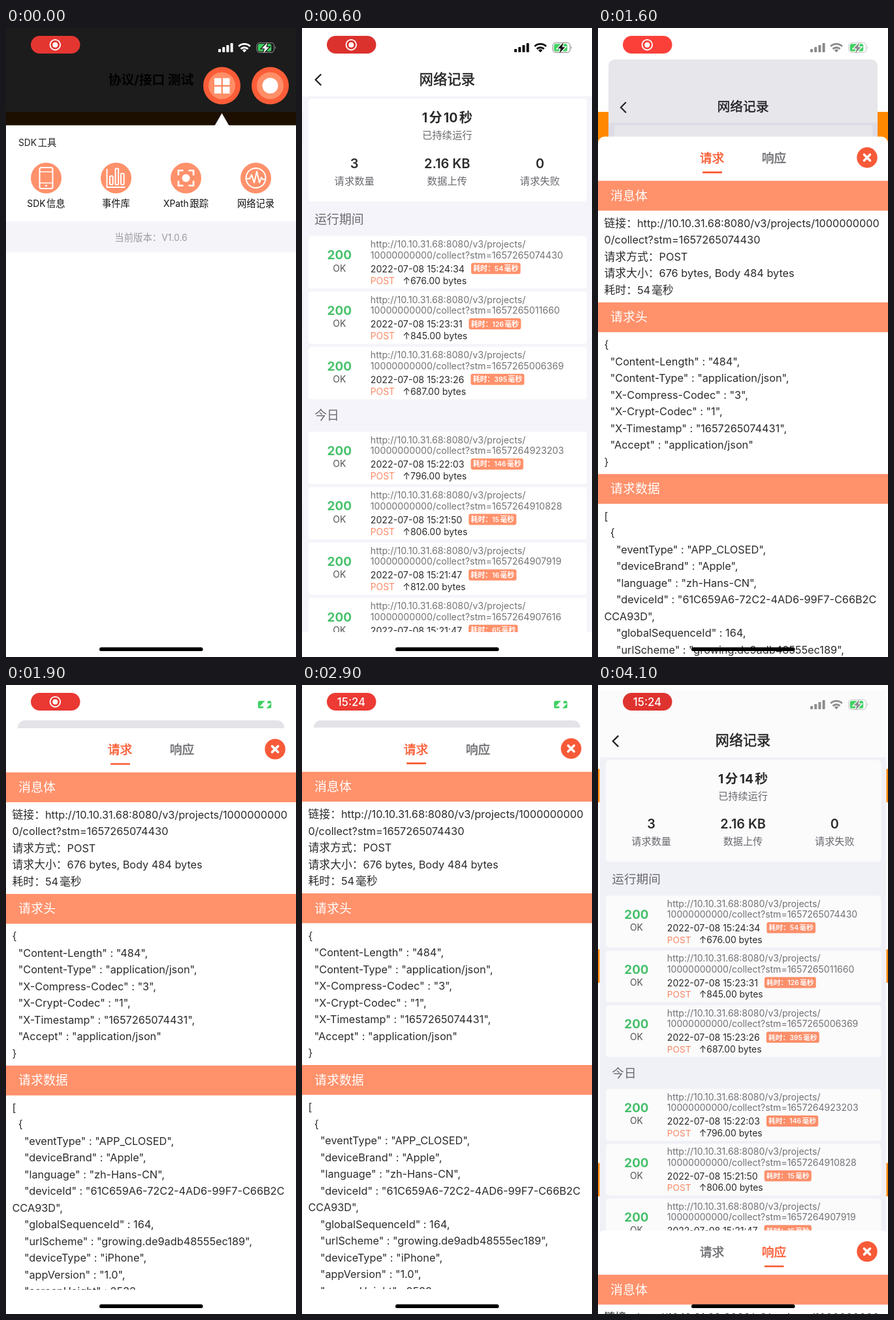
Animation, 444 px wide and 960 px high, one loop 4200 ms. Source, as an HTML page:

```html
<!DOCTYPE html>
<html lang="zh-CN">
<head>
<meta charset="utf-8">
<title>网络记录</title>
<style>
html, body { margin: 0; width: 100%; height: 100%; overflow: hidden; background: #fff; }
svg { display: block; width: 444px; height: 960px; font-family: Inter, "Noto Sans CJK SC", "Noto Sans CJK", sans-serif; }
</style>
</head>
<body>
<svg id="stage" viewBox="0 0 444 960" xmlns="http://www.w3.org/2000/svg"></svg>
<script>
const LOOP = 4200, STEP = 100;
const PUSH = 60, OPEN = 1395.6, CLOSE = 3912, TAB = 3300, CLOCK = 2400;
const RED = '#f9582f', PEACH = '#ff916b', DARK = '#2b2b2b', GREY = '#6a6a6f';

const pen = document.createElement('canvas').getContext('2d');
const measure = (str, font) => {
  pen.font = font + ' Inter, sans-serif';
  return pen.measureText(str).width;
};

const rect = (x, y, w, h, fill, r = 0, more = '') =>
  `<rect x="${x}" y="${y}" width="${w}" height="${h}" rx="${r}" fill="${fill}" ${more}/>`;
const circle = (x, y, r, fill, more = '') =>
  `<circle cx="${x}" cy="${y}" r="${r}" fill="${fill}" ${more}/>`;
const line = (d, width, color = '#fff', more = '') =>
  `<path d="${d}" fill="none" stroke="${color}" stroke-width="${width}" ${more}/>`;

// Chinese runs are slightly larger, with a small gap where they touch Latin ones
const HAN = /([\u3000-\u9fff\uff00-\uffef]+)/;
const mixed = (str, size) => str.split(HAN).filter(Boolean).map((run, i, all) => {
  const touch = i && /[\w\u4e00-\u9fff]$/.test(all[i - 1]) && /^[\w\u4e00-\u9fff]/.test(run);
  const em = HAN.test(run) ? size * 1.035 : size;
  return `<tspan font-size="${em.toFixed(2)}" dx="${touch ? (size * 0.12).toFixed(2) : 0}">${run}</tspan>`;
}).join('');

const text = (x, y, str, size, fill = DARK, weight = 400, anchor = 'start', more = '') =>
  `<text x="${x}" y="${y}" font-size="${size}" fill="${fill}" font-weight="${weight}" text-anchor="${anchor}" ${more}>${mixed(str, size)}</text>`;
const mid = (x, y, str, size, fill, weight, more) => text(x, y, str, size, fill, weight, 'middle', more);
// a thin outline gives the medium weight
const medium = (x, y, str, size, fill, id) =>
  mid(x, y, str, size, 'currentColor', 400, `id="${id}" color="${fill}" stroke="currentColor" stroke-width=".45"`);

function app() {
  return rect(0, 0, 444, 960, '#fff') +
    [128, 403.5, 729.5].map(y => rect(0, y, 444, 51, '#ff8800')).join('') +
    mid(222, 86, '协议/接口 测试', 19.1, '#000', 700);
}

function menu() {
  const button = x => circle(x, 88, 28.5, '#fc5d38') + circle(x, 88, 20.5, '#ff8f68');
  const tiles = [319, 332].map(x => [76.5, 89.5].map(y => rect(x, y, 10.5, 10.5, '#fff')).join('')).join('');
  const icons = [
    rect(51.5, 213, 20, 32, 'none', 2.5, 'stroke="#fff" stroke-width="2"') +
      line('M51.5 219.5h20M51.5 236.5h20', 1.6) + circle(61.5, 240.8, 1.5, '#fff'),
    line('M154.5 215v28H182.5', 2) +
      [[159, 226], [167.5, 214.5], [176, 222]].map(([x, y]) =>
        rect(x, y, 4.6, 239 - y, 'none', 1, 'stroke="#fff" stroke-width="2"')).join(''),
    line('M264 225v-7.5h7.5M279.5 217.5h7.5v7.5M287 233v7.5h-7.5M271.5 240.5h-7.5v-7.5', 2.6) +
      circle(275.5, 229, 6, '#fff'),
    circle(382.5, 229, 15, 'none', 'stroke="#fff" stroke-width="2"') +
      line('M368 230h5l3-6 4 12 4-17 4 17 3-8 2 3h4.5', 2, '#fff', 'stroke-linejoin="round"')
  ];
  const names = ['SDK信息', '事件库', 'XPath跟踪', '网络记录'];
  return rect(0, 0, 444, 960, '#000', 0, 'opacity=".89"') +
    button(330.5) + tiles + button(404.5) + circle(404.5, 88, 12, '#fff') +
    rect(0, 148.5, 444, 812, '#fff') +
    '<path d="M319.5 149l11-19 11 19z" fill="#fff"/>' +
    text(19, 180, 'SDK工具', 13.8, '#222') +
    icons.map((icon, i) => {
      const x = 61.5 + 107 * i;
      return circle(x, 229, 23.5, PEACH) + icon + mid(x, 273, names[i], 13.8, '#111');
    }).join('') +
    rect(0, 295, 444, 47.5, '#f5f5f9') +
    mid(222, 325, '当前版本：V1.0.6', 13.9, '#9b9b9f');
}

function row(y, [stm, clock, ms, bytes]) {
  const size = 14.2, date = '2022-07-08 ' + clock;
  const tagX = 104.5 + measure(date, size + 'px') + 10;
  const tagW = 62 + measure(ms, '600 10.6px');
  return rect(9.5, y, 426.5, 80, '#fff', 5) +
    mid(57, y + 35.8, '200', 19, '#47c26a', 700) +
    mid(57, y + 54, 'OK', 14, '#555') +
    text(104.5, y + 17.5, 'http://10.10.31.68:8080/v3/projects/', size, '#747478') +
    text(104.5, y + 34, '10000000000/collect?stm=' + stm, size, '#747478') +
    text(104.5, y + 55, date, size) +
    rect(tagX, y + 41, tagW, 17, PEACH, 3) +
    mid(tagX + tagW / 2, y + 53.4, `耗时：${ms}毫秒`, 10.5, '#fff', 600) +
    text(104.5, y + 73, 'POST', 13.9, '#fa8a66') +
    text(154, y + 73, `↑${bytes}.00 bytes`, 14);
}

function list() {
  const stats = [['3', '请求数量'], ['2.16 KB', '数据上传'], ['0', '请求失败']];
  const recent = [
    ['1657265074430', '15:24:34', '54', 676],
    ['1657265011660', '15:23:31', '126', 845],
    ['1657265006369', '15:23:26', '395', 687]
  ];
  const today = [
    ['1657264923203', '15:22:03', '146', 796],
    ['1657264910828', '15:21:50', '15', 806],
    ['1657264907919', '15:21:47', '16', 812],
    ['1657264907616', '15:21:47', '65', 812]
  ];
  const rows = (top, data) => data.map((d, i) => row(top + 84.6 * i, d)).join('');
  return rect(0, 0, 444, 960, '#fff', 0, 'id="paper"') +
    line('M29 70.5l-8.5 8.5 8.5 8.5', 2.3, '#222') +
    medium(222, 85.5, '网络记录', 20.6, '#222', 'title') +
    '<g clip-path="url(#safe)">' +
    rect(0, 104, 444, 818, '#f4f4fa') +
    rect(9.5, 108, 426.5, 157, '#fff', 5) +
    mid(222, 144, '', 19.4, DARK, 700, 'id="uptime"') +
    mid(222, 169, '已持续运行', 14.8, GREY) +
    stats.map(([n, label], i) =>
      mid(80 + 142 * i, 214, n, 20, DARK, 600) + mid(80 + 142 * i, 239, label, 14.8, GREY)).join('') +
    text(19, 299, '运行期间', 18.2, GREY) + rows(317.5, recent) +
    text(19, 598, '今日', 18.2, GREY) + rows(616, today) +
    '</g>' +
    rect(0, 0, 444, 960, '#140f35', 0, 'id="shade"');
}

const bar = (y, label) => rect(0, y, 444, 45.5, PEACH) + text(19, y + 29.5, label, 18.3, '#fff');

// leading spaces become indentation
const lines = (y, str) => str.split('\n').map((s, i) => {
  const t = s.trimStart();
  return text(9.5 + 4.6 * (s.length - t.length), y + 25.5 * i, t, 16.25);
}).join('');

const LINK = `链接：http://10.10.31.68:8080/v3/projects/1000000000
0/collect?stm=1657265074430
`;

function request() {
  return bar(132.5, '消息体') + lines(203, LINK + `请求方式：POST
请求大小：676 bytes, Body 484 bytes
耗时：54毫秒`) +
    bar(318, '请求头') + lines(388.5, `{
  "Content-Length" : "484",
  "Content-Type" : "application/json",
  "X-Compress-Codec" : "3",
  "X-Crypt-Codec" : "1",
  "X-Timestamp" : "1657265074431",
  "Accept" : "application/json"
}`) +
    bar(580, '请求数据') + lines(650, `[
  {
    "eventType" : "APP_CLOSED",
    "deviceBrand" : "Apple",
    "language" : "zh-Hans-CN",
    "deviceId" : "61C659A6-72C2-4AD6-99F7-C66B2C
CCA93D",
    "globalSequenceId" : 164,
    "urlScheme" : "growing.de9adb48555ec189",
    "deviceType" : "iPhone",
    "appVersion" : "1.0",
    "screenHeight" : 2532,`);
}

function response() {
  return bar(132.5, '消息体') + lines(203, LINK + `返回码：200
返回信息：OK`) +
    bar(292.5, '响应头') + lines(363, `{
  "Content-Type" : "application/json",
  "Connection" : "keep-alive",
  "Keep-Alive" : "timeout=60",
  "Date" : "Fri, 08 Jul 2022 07:24:34 GMT",
  "Access-Control-Allow-Origin" : "*",
  "Content-Length" : "2"
}`);
}

function sheet() {
  return rect(0, 65, 444, 960, '#fff', 10) +
    medium(174.5, 104.5, '请求', 18.1, RED, 'tabA') +
    medium(269.5, 104.5, '响应', 18.1, GREY, 'tabB') +
    rect(160, 118.3, 30, 2.6, RED, 1, 'id="mark"') +
    circle(412, 97, 15.7, '#f75a38') +
    line('M407.5 92.5l9 9M416.5 92.5l-9 9', 3.6, '#fff', 'stroke-linecap="round"') +
    `<g clip-path="url(#safe)"><g id="request">${request()}</g><g id="response">${response()}</g></g>`;
}

function status() {
  const bolt = 'M400.2 22.2l-8.7 9h4.6l-1.9 7 8.7-9h-4.6z';
  const bars = [5, 8, 11, 14].map((h, i) => rect(325 + 6.2 * i, 37 - h, 4, h, 'currentColor', 1)).join('');
  return rect(38, 12, 75.5, 27, RED, 13.5, 'id="pill"') +
    '<g id="rec">' + circle(75.3, 25.7, 7.8, 'none', 'stroke="#fff" stroke-width="1.8"') + circle(75.3, 25.7, 4, '#fff') + '</g>' +
    mid(75.5, 32, '15:24', 16.8, '#fff', 500, 'id="clock"') +
    '<g id="ink">' + bars +
    line('M356.2 28a12.5 12.5 0 0 1 17.6 0M359.5 32a7.8 7.8 0 0 1 11 0', 2.8, 'currentColor') +
    '<path d="M365 37.3l-3.2-3.4a4.6 4.6 0 0 1 6.4 0z" fill="currentColor"/>' +
    rect(384, 22.5, 26.5, 14.8, 'none', 4.5, 'stroke="currentColor" stroke-width="1.2" opacity=".45"') +
    '<path d="M412 27.5q2 2.4 0 4.8z" fill="currentColor" opacity=".5"/>' +
    `<mask id="cut">${rect(380, 18, 36, 24, '#fff')}<path d="${bolt}" stroke="#000" stroke-width="2.6"/></mask>` +
    rect(385.8, 24.3, 20.4, 11.2, '#3fd162', 2.6, 'mask="url(#cut)"') +
    `<path d="${bolt}" fill="currentColor"/></g>` +
    rect(143, 945.3, 158.5, 5.8, '#000', 2.9);
}

const stage = document.getElementById('stage');
stage.innerHTML = `<defs><clipPath id="safe">${rect(0, 0, 444, 922, '#000')}</clipPath></defs>` +
  app() +
  `<g id="menu">${menu()}</g><g id="list">${list()}</g><g id="sheet">${sheet()}</g>` +
  status();

const $ = id => document.getElementById(id);
const set = (id, name, value) => $(id).setAttribute(name, value);
const show = (id, on) => set(id, 'visibility', on ? 'visible' : 'hidden');
const ramp = (t, start, len) => Math.min(1, Math.max(0, (t - start) / len));
// critically damped spring from 0 to 1
const spring = ms => {
  const x = Math.max(0, ms) * 0.0183;
  return 1 - (1 + x) * Math.exp(-x);
};

function draw(t) {
  const push = spring(t - PUSH);
  const up = spring(t - OPEN) - spring(t - CLOSE);
  const scale = 1 - 0.081 * up;

  set('menu', 'transform', `translate(${-133 * push} 0)`);
  show('menu', push < 0.99);
  set('list', 'transform', `translate(${444 * (1 - push) + 222 * (1 - scale)} ${54 * up}) scale(${scale})`);
  set('paper', 'rx', 12 * up);
  set('shade', 'rx', 12 * up);
  set('shade', 'opacity', 0.115 * up);
  $('uptime').innerHTML = mixed(`1分${10 + Math.floor(t / 1000)}秒`, 19.4);

  set('sheet', 'transform', `translate(0 ${895 * (1 - up)})`);
  const second = t >= TAB, slide = ramp(t, TAB, 200);
  set('tabA', 'color', second ? GREY : RED);
  set('tabB', 'color', second ? RED : GREY);
  set('mark', 'x', 160 + 94.7 * slide * slide * (3 - 2 * slide));
  show('request', !second);
  show('response', second);

  const light = 1 - ramp(t, PUSH, 400) + ramp(t, OPEN, 400) - ramp(t, CLOSE, 400);
  const v = Math.round(15 + 240 * light);
  set('ink', 'color', `rgb(${v},${v},${v})`);
  const glow = 0.5 + 0.5 * Math.cos((t - 1380) * Math.PI / 1000);
  set('pill', 'fill', `rgb(${216 + 39 * glow},${48 + 18 * glow},${45 + 13 * glow})`);
  show('rec', t < CLOCK);
  show('clock', t >= CLOCK);
}

function tick() {
  // the clip runs at ten pictures a second
  draw(Math.floor(performance.now() % LOOP / STEP) * STEP);
  requestAnimationFrame(tick);
}
tick();
</script>
</body>
</html>
```
